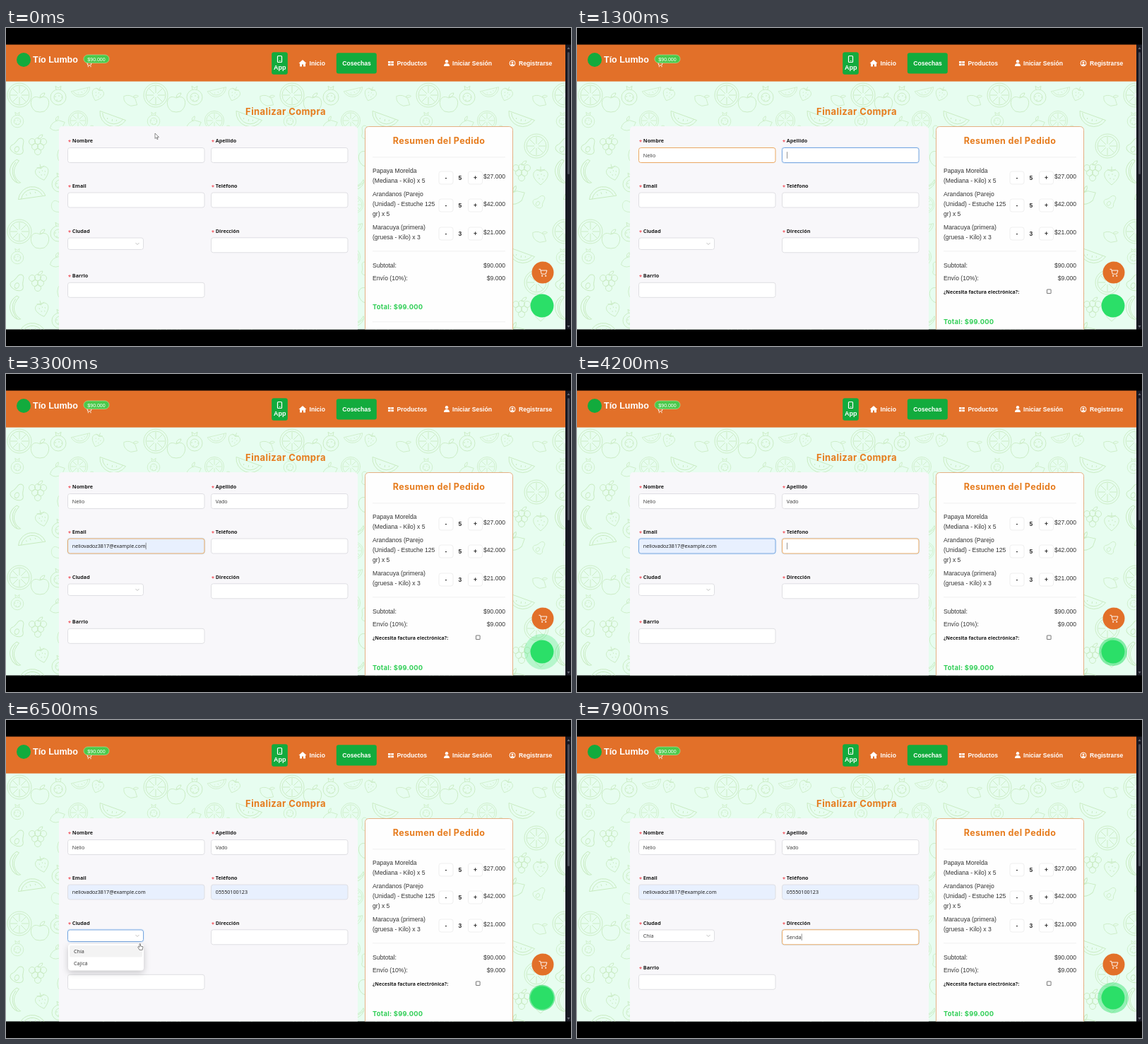
An HTML page for the animation above (8000 ms loop, 800 px wide and 450 px high).

```html
<!DOCTYPE html>
<html lang="es">
<head>
<meta charset="utf-8">
<title>Finalizar Compra</title>
<style>
  html, body { margin: 0; height: 100%; overflow: hidden; background: #000; }
  svg { display: block; width: 100vw; height: 100vh; }
  text { font-family: "Liberation Sans", Arial, sans-serif; font-size: 8.6px; fill: #333; }
  .strong, .nav, .head, .label { font-weight: 700; }
  .nav, .white { fill: #fff; }
  .head { font-family: Inter, sans-serif; letter-spacing: .03em; fill: #e67c1e; }
  .total { fill: #2fce55; }
  .label, .value, .error { font-family: "Open Sans", "Noto Sans", sans-serif; font-size: 7.2px; }
  .label { fill: #1c1c1c; }
  .filled { fill: #111; }
  .star, .error { fill: #f0505a; }
  .mid { text-anchor: middle; }
  .end { text-anchor: end; }
  .line { fill: none; stroke: #fff; stroke-linecap: round; stroke-linejoin: round; }
  #menu { filter: drop-shadow(0 3px 5px #0003); }
</style>
</head>
<body>
<svg id="stage" viewBox="0 0 800 450"></svg>
<script>
const LOOP = 8000, ORANGE = '#e27029', GREEN = '#12ab3d', LIME = '#2bdf68';
const stage = document.getElementById('stage');

const text = (x, y, str, cls = '', size = 0) =>
  `<text x="${x}" y="${y}" class="${cls}"${size ? ` style="font-size:${size}px"` : ''}>${str}</text>`;
const rect = (x, y, w, h, fill, r = 0, extra = '') =>
  `<rect x="${x}" y="${y}" width="${w}" height="${h}" rx="${r}" fill="${fill}" ${extra}/>`;
const circle = (x, y, r, fill, extra = '') =>
  `<circle cx="${x}" cy="${y}" r="${r}" fill="${fill}" ${extra}/>`;
const line = (d, width = 1) => `<path class="line" stroke-width="${width}" d="${d}"/>`;
const rule = y => rect(519, y, 188, 0.7, '#ececec');

// Fruit outlines, each drawn around its own centre
const spokes = r => Array.from({ length: 8 }, (_, i) => {
  const a = i * Math.PI / 4;
  return `M${3 * Math.cos(a)} ${3 * Math.sin(a)}L${r * Math.cos(a)} ${r * Math.sin(a)}`;
}).join('');
const leaf = '<path d="M0-9q1-6 7-6q-1 6-7 6"/>';
const seeds = '<path d="M-4-2v2M1-3v2M5-1v2M-2 3v2M3 4v2"/>';
const fruit = {
  citrus: `<circle r="17"/><circle r="14"/><path d="${spokes(13)}"/>`,
  apple: '<path d="M0-8C-14-15-17 4-6 11Q0 13 6 11C17 4 14-15 0-8"/>' + leaf,
  round: '<circle r="11"/><circle r="6"/><path d="M-3-11l-1-5 4 3 4-3-1 5"/>' + seeds,
  wedge: '<path d="M-19-6A20 20 0 0 0 19 2Z"/><path d="M-15-4A16 16 0 0 0 15 1"/><path d="M-7 2v2M0 3v3M6 3v2"/>',
  pear: '<path d="M0-13C-7-12-3-4-9 2C-14 13 14 13 9 2C3-4 7-12 0-13"/><ellipse cy="4" rx="3" ry="4"/>',
  berry: '<path d="M0 13C-17 0-10-10 0-8C10-10 17 0 0 13M-6-9L0-6 6-9M0-6v-7"/>' + seeds,
  banana: '<path d="M-14-8C-8 6 4 10 15 3C14 14-14 17-17-6Z"/><path d="M-14-3Q-6 12 13 7"/>',
  lemon: '<path d="M-14 0Q-8-10 5-8L14-1 6 7Q-8 11-14 0"/>' + leaf,
  grapes: [[-8, -5], [0, -6], [8, -5], [-4, 2], [4, 2], [0, 9]]
    .map(([x, y]) => circle(x, y, 4.5, 'none')).join('') + leaf
};
const layout = [
  ['citrus', 19, 19], ['apple', 48, 31], ['round', 74, 22], ['wedge', 106, 12, -25, .7],
  ['berry', 130, 17, 20, .8], ['wedge', 151, 50, 8], ['lemon', 176, 27, 35, .8],
  ['round', 16, 56, 0, .8], ['grapes', 45, 90], ['pear', 17, 92, 25], ['citrus', 102, 55, 0, .8],
  ['lemon', 73, 62, -20, .8], ['banana', 17, 128, 65], ['berry', 51, 128, -15, .9],
  ['pear', 124, 72, -20, .8], ['citrus', 88, 104, 0, .9], ['apple', 126, 108], ['citrus', 172, 91],
  ['wedge', 36, 162, 160], ['round', 76, 145], ['banana', 107, 143, -30, .9], ['grapes', 151, 127],
  ['berry', 178, 133], ['apple', 73, 176, 15, .7], ['citrus', 108, 174, 0, .7],
  ['lemon', 143, 164, -25], ['pear', 176, 170, 40, .8]
];
const pattern = `<pattern id="fruits" y="76" width="193" height="193" patternUnits="userSpaceOnUse">
  <g fill="none" stroke="#c7eabf" stroke-width=".9">${layout.map(([kind, x, y, turn = 0, scale = 1]) =>
    `<g transform="translate(${x} ${y}) rotate(${turn}) scale(${scale})">${fruit[kind]}</g>`).join('')}</g></pattern>`;

const cart = (x, y, s, w) => `<g transform="translate(${x} ${y}) scale(${s})">
  ${line('M-6-5h2l2 8h7l2-6h-10', w)}${circle(-1, 6, 1.2, '#fff')}${circle(5, 6, 1.2, '#fff')}</g>`;
const header = rect(0, 23, 792, 52.6, ORANGE)
  + circle(25, 45, 10, GREEN) + text(38, 49, 'Tío Lumbo', 'nav', 12.5)
  + cart(117, 51, .6, 1.5)
  + rect(110, 38, 36, 11.5, '#4bc94b', 6, 'stroke="#a4e59a" stroke-width=".7"')
  + text(128, 46.6, '$90.000', 'mid white', 7)
  + rect(376.2, 34.2, 22.6, 31.6, GREEN, 3) + rect(384.5, 39.5, 6, 9, 'none', 1, 'stroke="#fff" stroke-width="1.2"')
  + rect(387, 46, 1.4, 1, '#fff') + text(387.7, 59, 'App', 'nav mid', 9)
  + '<path fill="#fff" d="M420 45l5.5 5h-1.5v4.5h-3v-3h-2v3h-3v-4.5h-1.5z"/>' + text(429.5, 53, 'Inicio', 'nav')
  + rect(467.8, 35.2, 57, 29.4, GREEN, 3) + text(496.5, 53, 'Cosechas', 'nav mid')
  + [541, 545.3].map(x => rect(x, 47, 3.6, 2.6, '#fff') + rect(x, 50.6, 3.6, 2.6, '#fff')).join('')
  + text(553.5, 53, 'Productos', 'nav')
  + circle(624, 47.3, 2.2, '#fff') + '<path fill="#fff" d="M620 54q0-4 4-4t4 4z"/>' + text(632, 53, 'Iniciar Sesión', 'nav')
  + circle(717, 50, 4, 'none', 'stroke="#fff"') + circle(717, 49, 1.5, '#fff')
  + '<path fill="#fff" d="M714.3 53q0-2 2.7-2t2.7 2z"/>' + text(726, 53, 'Registrarse', 'nav');

const items = [
  [212, 5, '$27.000', 205.3, ['Papaya Morelda', '(Mediana - Kilo) x 5']],
  [251, 5, '$42.000', 238.3, ['Arandanos (Parejo', '(Unidad) - Estuche 125', 'gr) x 5']],
  [291, 3, '$21.000', 285.3, ['Maracuya (primera)', '(gruesa - Kilo) x 3']]
];
const step = (x, y, sign) => rect(x - 10, y - 9, 20, 18, '#fff', 3, 'stroke="#ebebeb" stroke-width=".8"')
  + text(x, y + 3, sign, 'mid strong');
const summary = rect(508.5, 139.5, 209, 310, '#fefefe', 5, 'stroke="#e3a878" stroke-width=".9"')
  + text(613, 164.4, 'Resumen del Pedido', 'head mid', 12.5) + rule(182.5)
  + items.map(([y, count, price, top, lines]) =>
      lines.map((str, i) => text(519, top + i * 13.9, str)).join('')
      + step(623, y, '-') + text(643, y + 3, count, 'mid strong') + step(664.5, y, '+')
      + text(707, y + 0.8, price, 'end')).join('')
  + rule(315.5) + text(519, 338.8, 'Subtotal:') + text(707, 338.8, '$90.000', 'end')
  + text(519, 356.8, 'Envío (10%):') + text(707, 356.8, '$9.000', 'end')
  + `<g id="invoice">${text(519, 376.3, '¿Necesita factura electrónica?:', 'label', 7)}
     ${rect(665.5, 370, 5.6, 5.6, '#fff', .3, 'stroke="#555" stroke-width=".8"')}</g>`
  + `<g id="total">${text(519, 398.4, 'Total: $99.000', 'head total', 9.3)}${rule(415.5)}</g>`;

// fill: moment of an autofill; typed: letters entered before it
const fields = {
  name: { label: 'Nombre', x: 87.5, y: 169.5, value: 'Nelio', start: 500, gap: 120, focus: [300, 1200], hover: [200, 2800] },
  last: { label: 'Apellido', x: 290.5, y: 169.5, value: 'Vado', start: 1500, gap: 120, focus: [1200, 2100] },
  mail: { label: 'Email', x: 87.5, y: 233, value: 'neliovadoz3817@example.com', start: 2300, gap: 150, typed: 4,
          fill: 3200, focus: [2100, 4300], hover: [2900, 3800], error: [2300, 3200] },
  phone: { label: 'Teléfono', x: 290.5, y: 233, value: '05550100123', start: 4600, gap: 0, typed: 0,
           fill: 4600, focus: [4100, 5800], hover: [3900, 4600] },
  city: { label: 'Ciudad', x: 87.5, y: 297, w: 107, h: 16.5, low: true, value: 'Chía', start: 6700, gap: 0, focus: [5800, 7100] },
  street: { label: 'Dirección', x: 290.5, y: 296.8, low: true, value: 'Senda', start: 7400, gap: 100, focus: [7100, 8000], hover: [7000, 8000] },
  area: { label: 'Barrio', x: 87.5, y: 360.3, low: true, value: '', start: LOOP, gap: 0, focus: [LOOP, LOOP] }
};
const drawField = ([id, { label, x, y, w = 193.5, h = 21 }]) => {
  const base = y - 7.2;
  return text(x + 0.5, base + 1, '*', 'label star') + text(x + 6.3, base, label, 'label')
    + rect(x - .7, y - .7, w + 1.4, h + 1.4, 'none', 3.5, `id="${id}Glow" stroke="#0591ff" stroke-opacity=".1" stroke-width="1.4"`)
    + rect(x, y, w, h, '#fff', 3, `id="${id}Box" stroke-width=".9"`)
    + `<text id="${id}Text" class="value" x="${x + 6.3}" y="${y + h / 2 + 2.8}"></text>`;
};
const group = low => Object.entries(fields).filter(([, f]) => !!f.low === low).map(drawField).join('');
const form = rect(75, 139, 423, 300, '#f8f7fa', 5) + group(false)
  + `<g id="error">${text(88, 262.8, 'Por favor ingresa un email válido', 'error')}</g>`
  + `<g id="low">${group(true)}<path d="M183.5 304l2.5 2.6 2.5-2.6" fill="none" stroke="#bbb" stroke-width=".9"/></g>`
  + rect(0, 0, .7, 9.5, '#666', 0, 'id="caret"')
  + `<g id="menu">${rect(88, 317, 107, 37.5, '#fff', 4)}${rect(90, 319, 103, 16.5, '#f3f3f3', 2)}
     ${text(96, 329.8, 'Chía', 'value')}${text(96, 347, 'Cajicá', 'value')}</g>`;

stage.innerHTML = `<defs>${pattern}<clipPath id="page">${rect(0, 23.6, 800, 402.8, '#000')}</clipPath></defs>
  ${rect(0, 0, 800, 450, '#000')}
  <g clip-path="url(#page)">
    ${rect(0, 75, 792, 352, '#e7fdf0')}${rect(0, 75, 792, 352, 'url(#fruits)')}
    ${header}${text(396, 122.7, 'Finalizar Compra', 'head mid', 13)}${form}${summary}
    ${circle(760, 346, 15.5, ORANGE)}${cart(760, 345.6, .85, 1.1)}
    ${circle(759, 393, 16.5, LIME, 'id="pulse"')}${circle(759, 393, 16.5, LIME)}
    ${rect(792, 23, 8, 404, '#181923')}${rect(795, 34, 3, 173, '#484a55', 1.5)}
    <path fill="#666973" d="M796.5 27l2 3h-4zM796.5 424l2-3h-4z"/>
    <path id="arrow" d="M0 0v7.5l1.8-1.7 1.2 2.8 1.2-.5-1.2-2.7h2.5z" fill="#fff" stroke="#444" stroke-width=".6"/>
    <path id="hand" d="M-1 0v4.5l-1.5-1-.8.8 2.3 4h4.2l.8-4.5-3.5-.8V0q-.7-.9-1.5 0z" fill="#fff" stroke="#333" stroke-width=".6"/>
  </g>`;

const el = {};
stage.querySelectorAll('[id]').forEach(node => el[node.id] = node);
const within = (t, [from, to] = [0, 0]) => t >= from && t < to;
const show = (id, on) => el[id].style.display = on ? '' : 'none';

// Pointer legs: start, end, from, to, shape
const legs = [
  [0, 200, 211, 149, 207, 166, 'arrow'],
  [2800, 2900, 200, 193, 170, 228, 'arrow'],
  [3800, 3900, 283, 244, 289, 244, 'arrow'],
  [5500, 5900, 340, 258, 182, 304, 'arrow'],
  [5900, 6400, 182, 304, 190, 317, 'hand'],
  [6400, 6600, 190, 317, 190, 317, 'hand'],
  [6600, 6800, 190, 317, 175, 327, 'hand'],
  [6800, 7000, 175, 327, 289, 310, 'arrow']
];

function movePointer(t) {
  show('arrow', false);
  show('hand', false);
  const leg = legs.find(l => within(t, l));
  if (!leg) return;
  const [from, to, x0, y0, x1, y1, shape] = leg;
  const p = (t - from) / (to - from), k = p * p * (3 - 2 * p);
  show(shape, true);
  el[shape].setAttribute('transform', `translate(${x0 + (x1 - x0) * k} ${y0 + (y1 - y0) * k})`);
}

function updateField(id, f, t) {
  const keyed = t < f.start ? 0 : f.gap ? Math.floor((t - f.start) / f.gap) + 1 : f.value.length;
  const filled = t >= f.fill;
  const count = filled ? f.value.length : Math.min(keyed, f.typed ?? f.value.length);
  const focused = within(t, f.focus), wrong = within(t, f.error);
  const label = el[id + 'Text'], box = el[id + 'Box'];
  label.textContent = f.value.slice(0, count);
  label.classList.toggle('filled', filled);
  box.setAttribute('fill', filled ? '#e8f0fe' : '#fff');
  box.setAttribute('stroke', wrong ? '#ee5a68' : within(t, f.hover) ? '#e9a052' : focused ? '#6f9fdc' : '#dcdce0');
  show(id + 'Glow', focused);
  if (!focused || id === 'city') return;
  const last = filled ? f.fill : count ? f.start + (count - 1) * f.gap : f.focus[0];
  show('caret', (t - last) % 1000 < 500);
  el.caret.setAttribute('x', f.x + 6.5 + (count ? label.getComputedTextLength() : 0));
  el.caret.setAttribute('y', f.y + 5.7);
}

function draw(now) {
  const t = Math.floor(now % LOOP / 100) * 100;
  show('caret', false);
  for (const id in fields) updateField(id, fields[id], t);
  const wrong = within(t, fields.mail.error);
  show('error', wrong);
  el.low.setAttribute('transform', `translate(0 ${wrong ? 3.3 : 0})`);
  show('menu', within(t, [6000, 6700]));
  show('invoice', t >= 500);
  el.total.setAttribute('transform', `translate(0 ${t >= 500 ? 21 : 0})`);
  const age = Math.min((t + 800) % 1200 / 800, 1);
  el.pulse.setAttribute('r', 16.5 + 14 * age);
  el.pulse.setAttribute('opacity', 0.7 * (1 - age));
  movePointer(t);
  requestAnimationFrame(draw);
}
requestAnimationFrame(draw);
</script>
</body>
</html>
```
